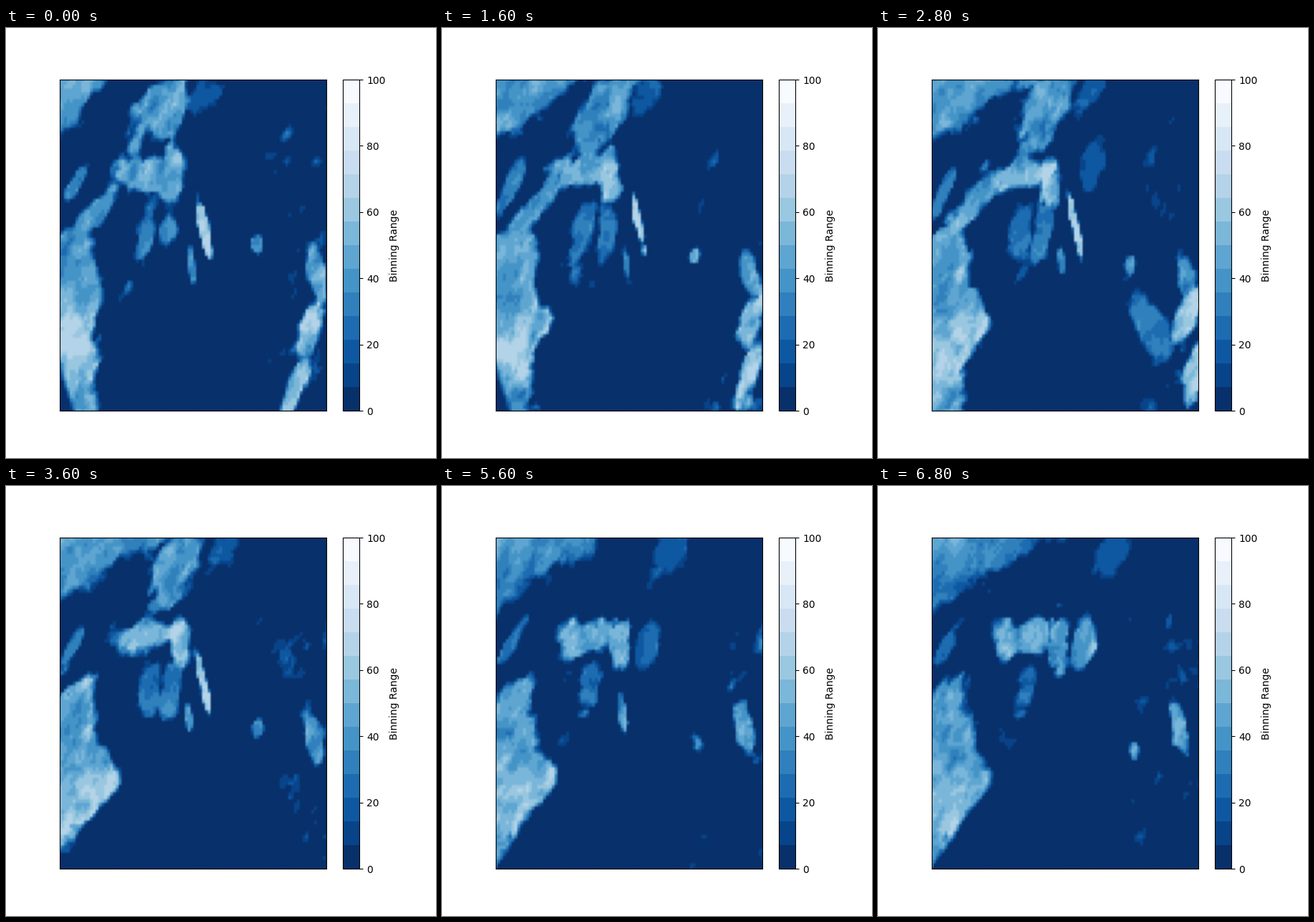
Write a matplotlib script that moves like this. It is 600 by 600 pixels and loops after 7.2 s.

```python
import numpy as np
import matplotlib.pyplot as plt
from matplotlib.animation import FuncAnimation
from matplotlib.cm import ScalarMappable
from matplotlib.colors import Normalize

FRAMES, INTERVAL = 18, 400
LAST = FRAMES - 1
LEFT, RIGHT, TOP, BOTTOM = 75, 447, 72, 534
NX, NY = 94, 94

X, Y = np.meshgrid(np.linspace(LEFT, RIGHT, NX), np.linspace(TOP, BOTTOM, NY))
rng = np.random.default_rng(5)


def ramp(a):
    return np.clip(a, 0, 1)


def lattice(cw, ch):
    """Smooth value noise, sheared so that its grain leans to the right."""
    u = (X - LEFT + 0.3 * (Y - TOP)) / cw
    v = (Y - TOP) / ch
    grid = rng.random((int(v.max()) + 2, int(u.max()) + 2))
    i, j = v.astype(int), u.astype(int)
    a, b = v - i, u - j
    a, b = a * a * (3 - 2 * a), b * b * (3 - 2 * b)
    upper = grid[i, j] * (1 - b) + grid[i, j + 1] * b
    lower = grid[i + 1, j] * (1 - b) + grid[i + 1, j + 1] * b
    return upper * (1 - a) + lower * a


def fractal(cw, ch):
    """Three octaves of noise with mean 0 and deviation 1."""
    total = sum(lattice(cw / 2**k, ch / 2**k) / 1.5**k for k in range(3))
    return (total - total.mean()) / total.std()


STEP = 4
KEYS = range(LAST // STEP + 2)
RAGGED = [fractal(26, 38) for _ in KEYS]
GRAIN = [fractal(20, 34) for _ in KEYS]


def evolve(layers, n):
    """Turn one noise layer into the next without losing contrast."""
    k, part = divmod(n, STEP)
    angle = part / STEP * np.pi / 2
    return layers[k] * np.cos(angle) + layers[k + 1] * np.sin(angle)


def cloud(x, y, rx, ry, lean, value, drift=(0, 0), life=(0, LAST)):
    """Leaning ellipse that drifts over the loop and fades around its life."""
    def layer(n, ragged):
        cx = x + drift[0] * n / LAST
        cy = y + drift[1] * n / LAST
        u = X - cx + lean * (Y - cy)
        q = np.hypot(u / rx, (Y - cy) / ry)
        fade = ramp((n - life[0]) / 2 + 1) * ramp((life[1] - n) / 2 + 1)
        return ramp((1.15 - q + 0.2 * ragged) / 0.35), value * fade
    return layer


def corner(n, ragged):
    """Bank in the upper left, spreading along the top and thinning out."""
    width = 75 + 115 * np.sqrt(n / LAST)
    s = (X - LEFT) / width + (Y - TOP) / (92 + 15 * n / LAST)
    return ramp((1 - s + 0.08 * ragged) / 0.15), 51 - 10 * n / LAST - 13 * ramp(s)


def column(n, ragged):
    """Bank along the left side whose foot is pushed out of the picture."""
    bulge = 30 * ramp(n / 4 + 0.1) * np.exp(-((Y - 405) / 38) ** 2)
    slide = 52 * ramp((n - 6) / 3) * ramp((Y - 430) / 100)
    inner = 131 + bulge - slide + 5 * ragged - X
    crest = 285 - 0.6 * (X - LEFT) + 7 * ragged
    gap = 24 * ramp((7 - n) / 2) * (Y - 460) / 74
    mask = ramp(inner / 10) * ramp((Y - crest) / 12) * ramp((X - LEFT - gap) / 8 + 1)
    glow = (20 - 13 * n / LAST) * np.exp(-((Y - 440) / 50) ** 2)
    return mask, 42 + 7 * ramp(1 - inner / 32) + glow


def wisps(n, ragged):
    """Scattered scraps on the right and below the central cloud."""
    right = ramp((X - 320) / 80) * ramp((Y - 90) / 60)
    middle = np.exp(-((X - 185) / 45) ** 2 - ((Y - 335) / 75) ** 2)
    return ramp(0.8 * right + middle), 18 * (ragged - 1)


LAYERS = [
    corner, column, wisps,
    # arm, central cloud and the plume above it
    cloud(118, 268, 18, 62, 0.65, 43, life=(0, 7)),
    cloud(195, 202, 46, 25, 0.3, 47, drift=(8, 10)),
    cloud(230, 205, 15, 38, 0, 53, drift=(20, 18)),
    cloud(213, 115, 32, 62, 0.5, 41, drift=(50, -5), life=(0, 9)),
    cloud(241, 100, 10, 48, 0.2, 50, drift=(18, 0), life=(0, 10)),
    cloud(275, 92, 20, 32, 0.3, 19, drift=(48, 0)),
    cloud(287, 218, 15, 30, 0.2, 48, life=(15, LAST)),
    # trails below the centre
    cloud(195, 280, 15, 42, 0.15, 29, drift=(10, 5)),
    cloud(225, 285, 14, 42, 0.1, 32, drift=(10, 0), life=(0, 9)),
    cloud(275, 278, 6, 40, -0.2, 61, life=(0, 10)),
    cloud(259, 335, 6, 28, -0.1, 42, drift=(-8, -20), life=(0, 14)),
    cloud(95, 222, 10, 32, 0.5, 28),
    # right side
    cloud(349, 302, 8, 15, 0, 47, drift=(8, 68)),
    cloud(434, 350, 13, 40, -0.2, 41, drift=(-14, -10)),
    cloud(422, 418, 16, 42, 0.3, 59, drift=(25, -40), life=(0, 7)),
    cloud(398, 512, 14, 45, 0.3, 57, drift=(110, -80), life=(0, 7)),
    cloud(376, 412, 22, 58, -0.3, 60, life=(6, 6)),
    cloud(300, 190, 15, 32, 0.1, 36, life=(6, 6)),
]


def sky(n):
    """Cloud cover in percent."""
    ragged, grain = evolve(RAGGED, n), evolve(GRAIN, n)
    field = np.zeros_like(X)
    for layer in LAYERS:
        mask, value = layer(n, ragged)
        field = np.maximum(field, mask * value * (1 + 0.14 * grain))
    return np.minimum(field, 68)


fig, ax = plt.subplots(figsize=(6, 6), dpi=100)
cmap = plt.get_cmap("Blues_r", 14)
norm = Normalize(0, 100)

image = ax.imshow(cmap(norm(sky(0))), interpolation="hanning", aspect="auto")
ax.set(xlim=(0, NX - 1), ylim=(NY - 1, 0), xticks=[], yticks=[])
fig.colorbar(ScalarMappable(norm, cmap), ax=ax, label="Binning Range")


def update(n):
    image.set_data(cmap(norm(sky(n))))
    return [image]


anim = FuncAnimation(fig, update, frames=FRAMES, interval=INTERVAL,
                     repeat=True, repeat_delay=0)
plt.show()
```
